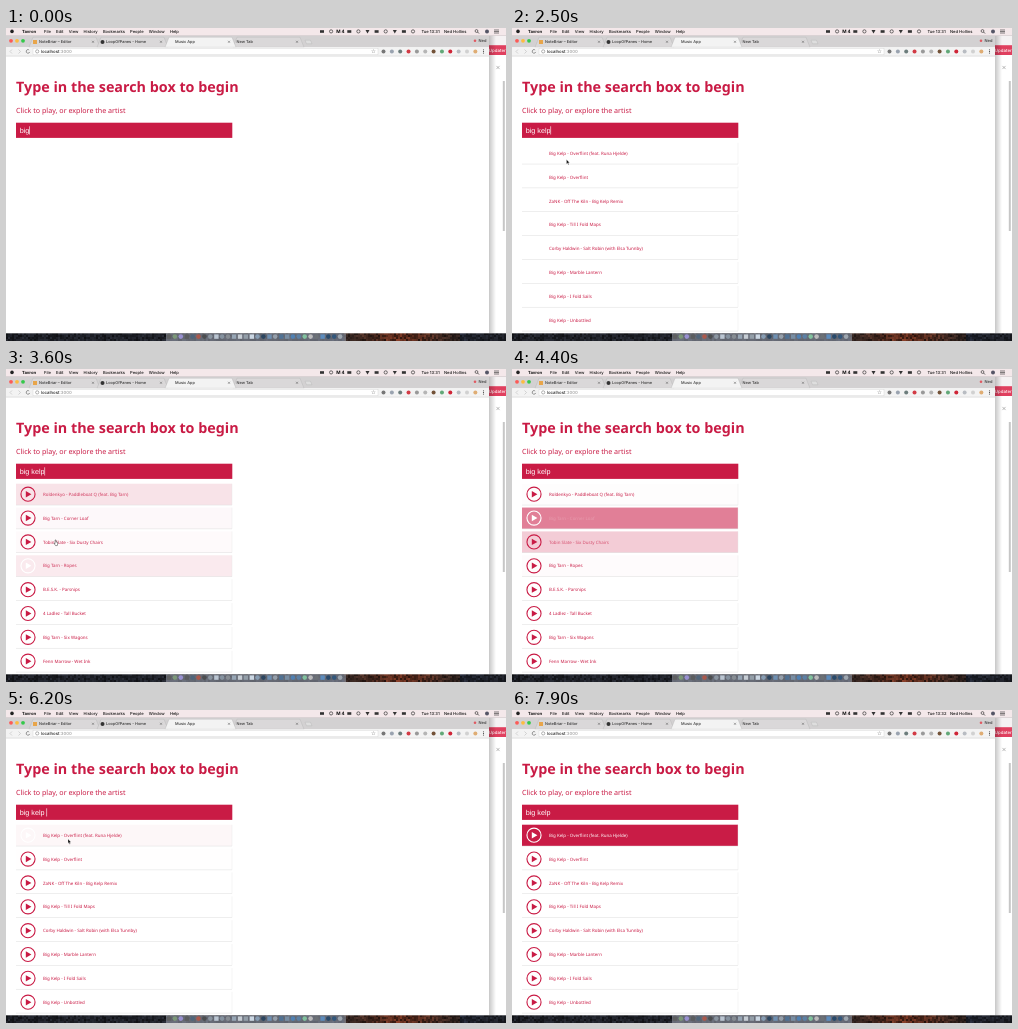
Recreate the animation shown at these times as an HTML page with a canvas. Size 500 px wide and 313 px high, loop 8000 ms.

```html
<!DOCTYPE html>
<html lang="en">
<head>
<meta charset="utf-8">
<title>Music App</title>
<style>
html, body { margin: 0; width: 100%; height: 100%; overflow: hidden; background: #fff; }
canvas { display: block; width: 500px; height: 313px; }
</style>
</head>
<body>
<canvas id="stage"></canvas>
<script>
const LOOP = 8000, RED = '#c91b45';
const SANS = '"Noto Sans", sans-serif', UI = 'Inter, sans-serif', INPUT = '"Liberation Sans", Arial, sans-serif';
const ROW_TOP = 114.7, ROW_PITCH = 23.86, ROW_HEIGHT = 21.3;
const FIRST_LIST = 2300, ICONS_READY = 2800, SECOND_SEARCH = 5900;
const canvas = document.getElementById('stage');
const c = canvas.getContext('2d');
const dpr = window.devicePixelRatio || 1;
canvas.width = 500 * dpr;
canvas.height = 313 * dpr;

const kelpSongs = [
  'Big Kelp - Overflint (feat. Runa Hjelde)',
  'Big Kelp - Overflint',
  'ZaNK - Off The Kiln - Big Kelp Remix',
  'Big Kelp - Till I Fold Maps',
  'Corby Haldwin - Salt Robin (with Elsa Tunnby)',
  'Big Kelp - Marble Lantern',
  'Big Kelp - I Fold Sails',
  'Big Kelp - Unbottled'
];
const tarnSongs = [
  'Roldenkyo - Paddleboat Q (feat. Big Tarn)',
  'Big Tarn - Corner Loaf',
  'Tobin Slate - Six Dusty Chairs',
  'Big Tarn - Ropes',
  'B.E.S.K. - Parsnips',
  '4 Ladlez - Tall Bucket',
  'Big Tarn - Six Wagons',
  'Fenn Marrow - Wet Ink'
];

// Pointer route: time, x, y
const route = [
  [2200, 62, 142], [2500, 54.5, 131.5], [3030, 54, 133], [3120, 6, 180],
  [3500, 6, 195], [3560, 45, 196], [3600, 48.5, 171], [4050, 50, 160.5], [4450, 50, 150],
  [4600, 46, 104], [5200, 42, 106], [5500, 43, 114.5], [6100, 46, 110], [6200, 62, 129]
];
const pointerHidden = t => t < 2200 || (t > 4250 && t < 5200) || t > 6950;

function pointerAt(t) {
  const next = route.findIndex(p => p[0] > t);
  if (next < 1) return (next ? route[route.length - 1] : route[0]).slice(1);
  const a = route[next - 1], b = route[next], k = (t - a[0]) / (b[0] - a[0]);
  return [1, 2].map(i => a[i] + (b[i] - a[i]) * k);
}

function hoveredRow(t) {
  const [x, y] = pointerAt(t - 60);
  const row = Math.floor((y - ROW_TOP) / ROW_PITCH);
  const inside = x > 10 && x < 226 && y - ROW_TOP - row * ROW_PITCH < ROW_HEIGHT;
  return t > ICONS_READY && inside ? row : -1;
}

// Each row's highlight eases towards 1 while hovered and back to 0 afterwards.
function highlights(t) {
  const levels = kelpSongs.map(() => 0), step = 10, ease = 320;
  for (let s = ICONS_READY; s < t; s += step) {
    const row = hoveredRow(s), k = 1 - Math.exp(-Math.min(step, t - s) / ease);
    levels.forEach((v, i) => levels[i] += ((i === row) - v) * k);
  }
  return levels;
}

const mix = k => `rgb(${[201, 27, 69].map(v => Math.round(v + (255 - v) * k))})`;

function seeded(seed) {
  return () => (seed = seed * 16807 % 2147483647) / 2147483647;
}

function rect(x, y, w, h, fill) {
  c.fillStyle = fill;
  c.fillRect(x, y, w, h);
}
function dot(x, y, r, fill) {
  c.fillStyle = fill;
  c.beginPath();
  c.arc(x, y, r, 0, 7);
  c.fill();
}
function ring(x, y, r, color, width, from = 0, to = 7) {
  c.strokeStyle = color;
  c.lineWidth = width;
  c.beginPath();
  c.arc(x, y, r, from, to);
  c.stroke();
}
function poly(points, fill, stroke, width = .5) {
  c.beginPath();
  points.forEach(([x, y]) => c.lineTo(x, y));
  if (fill) {
    c.closePath();
    c.fillStyle = fill;
    c.fill();
  }
  if (stroke) {
    c.strokeStyle = stroke;
    c.lineWidth = width;
    c.stroke();
  }
}
// Draws a line of text and returns where it ends.
function text(str, x, y, size, color, family = UI, weight = 500) {
  c.font = `${weight} ${size}px ${family}`;
  c.fillStyle = color;
  c.fillText(str, x, y);
  return x + c.measureText(str).width;
}
function cross(x, y, r, color) {
  for (const d of [-r, r]) poly([[x - r, y - d], [x + r, y + d]], null, color);
}

function menuBar(t) {
  rect(0, 0, 500, 7.5, '#f4e8ea');
  rect(0, 7.2, 500, .4, '#c4bcbe');
  dot(6, 3.4, 1.8, '#222');
  text('Tavron', 16, 5, 4.2, '#111', UI, 700);
  let x = 38;
  for (const item of ['File', 'Edit', 'View', 'History', 'Bookmarks', 'People', 'Window', 'Help'])
    x = text(item, x, 5, 4.1, '#111') + 5.2;
  for (let i = 0; i < 11; i++) {
    const mid = 316 + i * 9.1;
    if (i === 2) text('M 4', mid - 4, 5.2, 4.6, '#111', UI, 700);
    else if (i % 3 === 0) rect(mid - 2, 2.2, 4, 2.6, '#333');
    else if (i % 3 === 1) ring(mid, 3.4, 1.6, '#333', .7);
    else poly([[mid - 2, 2], [mid + 2, 2], [mid, 5.4]], '#333');
  }
  text(t < 7100 ? 'Tue 13:31' : 'Tue 13:32', 415.5, 5, 4.1, '#111');
  text('Ned Hollins', 438, 5, 4.1, '#111');
  ring(470.5, 3, 1.4, '#222', .6);
  poly([[471.5, 4], [473, 5.5]], null, '#222', .7);
  dot(481, 3.4, 2, '#556');
  for (let y = 1.7; y < 5; y += 1.5) rect(488, y, 5, .6, '#333');
}

function backWindow() {
  rect(483, 7.7, 17, 297.6, '#fff');
  rect(483, 7.7, 17, 9.5, '#f5f2f3');
  rect(483, 17.2, 17, 9.8, '#e0405f');
  text('Updater', 482.8, 23.8, 4.4, '#fff');
  cross(492, 39.5, 1.6, '#777');
  rect(496.8, 53, 2, 150, '#c6c6c6');
  const shade = c.createLinearGradient(483, 0, 490, 0);
  shade.addColorStop(0, 'rgba(0,0,0,.22)');
  shade.addColorStop(1, 'rgba(0,0,0,0)');
  rect(483, 7.7, 7, 297.6, shade);
}

function tab(x0, label, labelX, active) {
  const x1 = x0 + 67;
  poly([[x0 - 2, 19.3], [x0 + 2, 9.2], [x1 - 2, 9.2], [x1 + 2, 19.3]], active ? '#f3f3f3' : '#dad8d9', '#b4b4b4', .4);
  text(label, labelX, 15.2, 3.9, '#333');
  cross(x1 - 5, 13.8, 1, '#555');
}

function browser() {
  rect(0, 7.7, 483, 297.6, '#fff');
  rect(0, 7.7, 483, 11.6, '#d3d1d2');
  ['#fc5b57', '#fdbc40', '#34c84a'].forEach((color, i) => dot(5 + i * 6, 12.8, 1.9, color));
  tab(25, 'NoteBriar – Editor', 33);
  tab(93, 'LoopOfPanes - Home', 100);
  tab(229, 'New Tab', 230.5);
  tab(161, 'Music App', 169, true);
  rect(27, 12, 4, 4, '#e8a54a');
  dot(96.5, 14, 2, '#333');
  poly([[299, 12.2], [304.5, 12.2], [306, 15.8], [300.5, 15.8]], '#dedede', '#b4b4b4', .4);
  dot(469, 12.7, 1.3, '#e05a62');
  text('Ned', 472.5, 14.2, 4, '#333');

  rect(0, 19.3, 483, 8.7, '#f3f3f3');
  rect(0, 27.8, 483, .5, '#c4c4c4');
  for (const [x, d] of [[5, -1], [13.5, 1]])
    poly([[x - d, 21.5], [x + d, 23.5], [x - d, 25.5]], null, '#bbb', .6);
  ring(22, 23.4, 1.8, '#555', .6, .3, 5.4);
  rect(27, 20.2, 345, 6.6, '#fff');
  c.strokeStyle = '#d0d0d0';
  c.lineWidth = .4;
  c.strokeRect(27, 20.2, 345, 6.6);
  ring(31.2, 23.4, 1.6, '#666', .5);
  text(':3000', text('localhost', 34.8, 25, 4.3, '#222'), 25, 4.3, '#999');
  text('☆', 365, 25.4, 5.4, '#555', '"DejaVu Sans", sans-serif');
  ['#777', '#9aa3b0', '#6c7d7c', '#d23b45', '#999', '#b5b5b5', '#735238', '#62a878', '#cf2537', '#b8bcc2', '#d1d1d1', '#dfad74']
    .forEach((color, i) => dot(377.5 + i * 8.35, 23.4, 2, color));
  for (let y = 21.7; y < 26; y += 1.7) dot(477.5, y, .55, '#555');
}

function desktop() {
  const rand = seeded(77);
  for (let x = 0; x < 500; x += 2) {
    const glow = Math.exp(-(((x - 395) / 45) ** 2));
    for (let y = 305; y < 313; y += 2)
      rect(x, y, 2, 2, `hsl(${glow > .2 ? 14 : 225}, ${14 + glow * 40}%, ${7 + rand() * 12 + glow * 18 * rand()}%)`);
  }
  rect(160, 305.5, 180, 7.5, 'rgba(150, 156, 168, .6)');
  for (let x = 163; x < 339; x += 5.9) {
    const color = `hsl(${rand() < .7 ? 210 : 360 * rand()}, ${45 * rand()}%, ${25 + 60 * rand()}%)`;
    if (rand() < .5) rect(x - 2, 306.4, 4.4, 4.4, color);
    else dot(x, 308.6, 2.3, color);
  }
}

function searchBox(t) {
  rect(10, 94.7, 216.3, 15.2, RED);
  // The word is typed at a steady pace, then a space before searching again.
  const typed = Math.max(0, Math.min(5, Math.floor((t - 75) / 275)));
  const value = 'big kelp'.slice(0, 3 + typed) + (t > 5100 ? ' ' : '');
  const end = text(value, 13.7, 105, 7.2, '#fff', INPUT, 400);
  const lastKey = t > 5100 ? 5100 : 75 + typed * 275;
  if ((t - lastKey + 1000) % 1000 < 500 || t < 75) rect(end, 98.3, .6, 8.2, '#fff');
}

function songRow(label, i, k, hovered, icons) {
  const top = ROW_TOP + i * ROW_PITCH, mid = top + 10.5;
  rect(10, top, 216, ROW_HEIGHT, mix(1 - k));
  rect(10, top + 21.1, 216, .5, '#dcdcdc');
  rect(225.8, top, .4, ROW_HEIGHT, '#e6e6e6');
  text(label, 37, mid + 1.6, 4.45, mix(k), SANS);
  if (!icons) return;
  const color = hovered ? '#fff' : RED;
  ring(22, mid, 7.05, color, 1.1);
  poly([[19.8, mid - 3.2], [25.4, mid], [19.8, mid + 3.2]], color);
}

function songs(t) {
  if (t < FIRST_LIST) return;
  const list = t >= ICONS_READY && t < SECOND_SEARCH ? tarnSongs : kelpSongs;
  const levels = highlights(t), row = hoveredRow(t);
  list.forEach((label, i) => songRow(label, i, levels[i], i === row, t >= ICONS_READY));
}

function pointer(t) {
  if (pointerHidden(t)) return;
  c.save();
  c.translate(...pointerAt(t));
  if (hoveredRow(t) > 0) {
    poly([[.6, 0], [1.5, 0], [1.6, 2], [3.4, 2.5], [2.8, 5.6], [1, 5.6], [-.5, 3.4], [.6, 3.5], [.6, 0]], '#fff', '#222', .45);
  } else {
    poly([[0, 0], [0, 4.4], [1, 3.5], [1.7, 5.2], [2.4, 4.9], [1.7, 3.3], [3.1, 3.2], [0, 0]], '#111', '#fff', .25);
  }
  c.restore();
}

function draw(t) {
  c.setTransform(dpr, 0, 0, dpr, 0, 0);
  c.textRendering = 'geometricPrecision';
  desktop();
  backWindow();
  browser();
  menuBar(t);
  text('Type in the search box to begin', 10, 63.6, 14.34, RED, SANS, 700);
  text('Click to play, or explore the artist', 10, 85.2, 7.14, RED, SANS, 400);
  searchBox(t);
  songs(t);
  pointer(t);
}

const start = performance.now();
function frame() {
  draw((performance.now() - start) % LOOP);
  requestAnimationFrame(frame);
}
frame();
</script>
</body>
</html>
```
